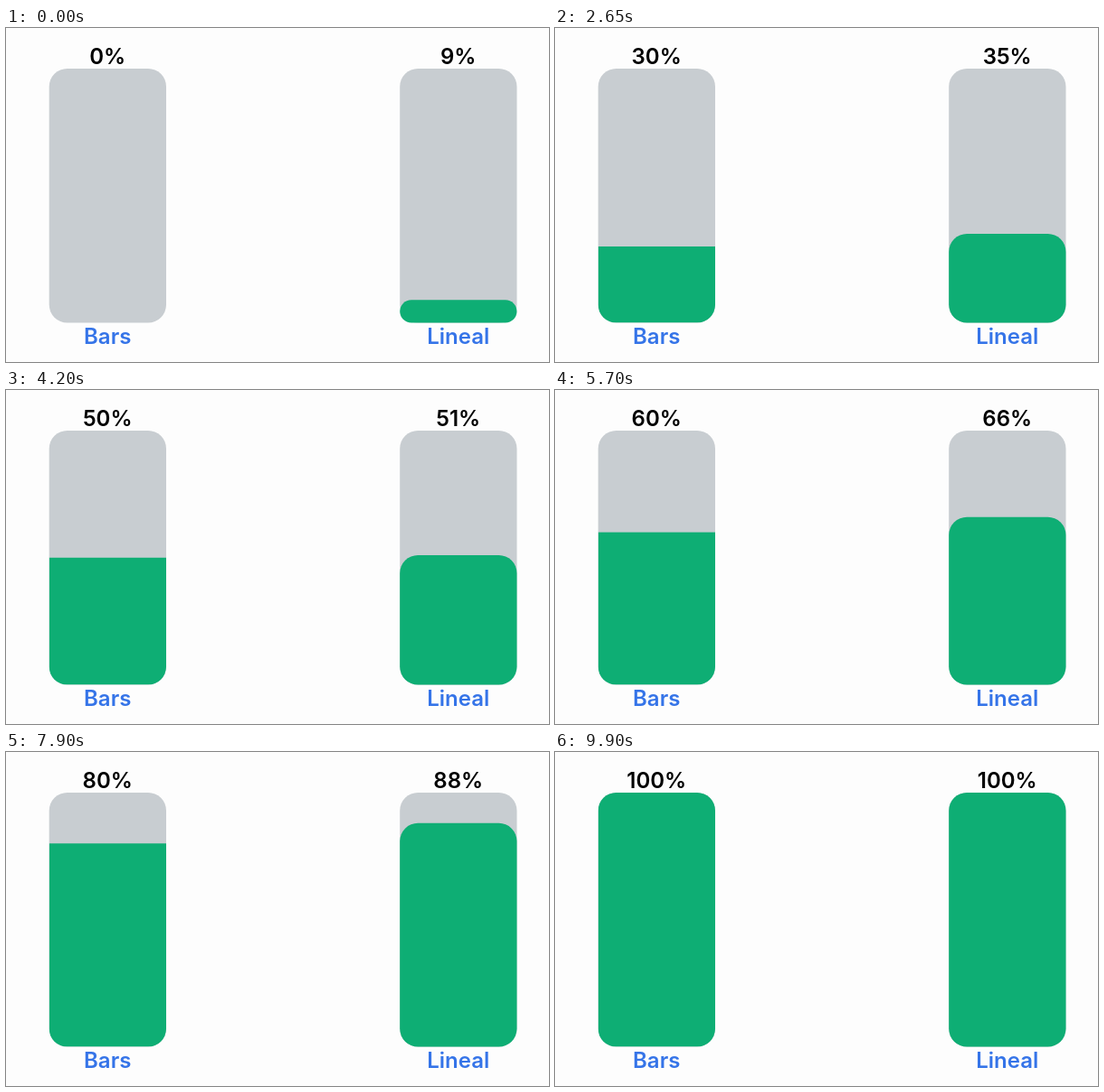
Write an HTML page that moves like this. It is 600 px wide and 370 px high and loops after 9950 ms.

```html
<!DOCTYPE html>
<html lang="en">
<head>
<meta charset="utf-8">
<title>Bars and lineal progress</title>
<style>
  html, body { margin: 0; width: 100%; height: 100%; overflow: hidden; background: #fdfdfd; }
  svg { display: block; width: 600px; height: 370px; }
  text { font: 600 24px Inter, sans-serif; text-anchor: middle; }
  .track { fill: #c8cdd1; }
  .fill { fill: #0eae74; }
  .label { fill: #3574e8; }
</style>
</head>
<body>
<svg viewBox="0 0 600 370">
  <defs>
    <clipPath id="round"><rect x="47.7" y="45" width="129.3" height="281.5" rx="20"/></clipPath>
  </defs>
  <rect class="track" x="47.7" y="45" width="129.3" height="281.5" rx="20"/>
  <g clip-path="url(#round)"><rect id="barsFill" class="fill" x="47.7" width="129.3"/></g>
  <text id="barsValue" x="112.2" y="39.5"></text>
  <text class="label" x="112.2" y="350">Bars</text>

  <rect class="track" x="435.2" y="45" width="129.3" height="281.5" rx="20"/>
  <rect id="linealFill" class="fill" x="435.2" width="129.3"/>
  <text id="linealValue" x="499.7" y="39.5"></text>
  <text class="label" x="499.7" y="350">Lineal</text>
</svg>
<script>
  const LOOP = 9950, START = 9, TICK = 100, STEP = 10;
  const HEIGHT = 281.5, BOTTOM = 326.5, RADIUS = 20;
  const byId = id => document.getElementById(id);

  function setBar(name, percent, radius) {
    const h = HEIGHT * percent / 100;
    const fill = byId(name + 'Fill');
    fill.setAttribute('y', BOTTOM - h);
    fill.setAttribute('height', h);
    fill.setAttribute('rx', Math.min(radius, h / 2));
    const text = percent + '%';
    const value = byId(name + 'Value');
    if (value.textContent !== text) value.textContent = text;
  }

  function draw(t) {
    const percent = Math.min(100, START + Math.floor(t / TICK));
    setBar('bars', Math.floor(percent / STEP) * STEP, 0);
    setBar('lineal', percent, RADIUS);
  }

  const begin = performance.now();
  function frame() {
    draw((performance.now() - begin) % LOOP);
    requestAnimationFrame(frame);
  }
  draw(0);
  requestAnimationFrame(frame);
</script>
</body>
</html>
```
